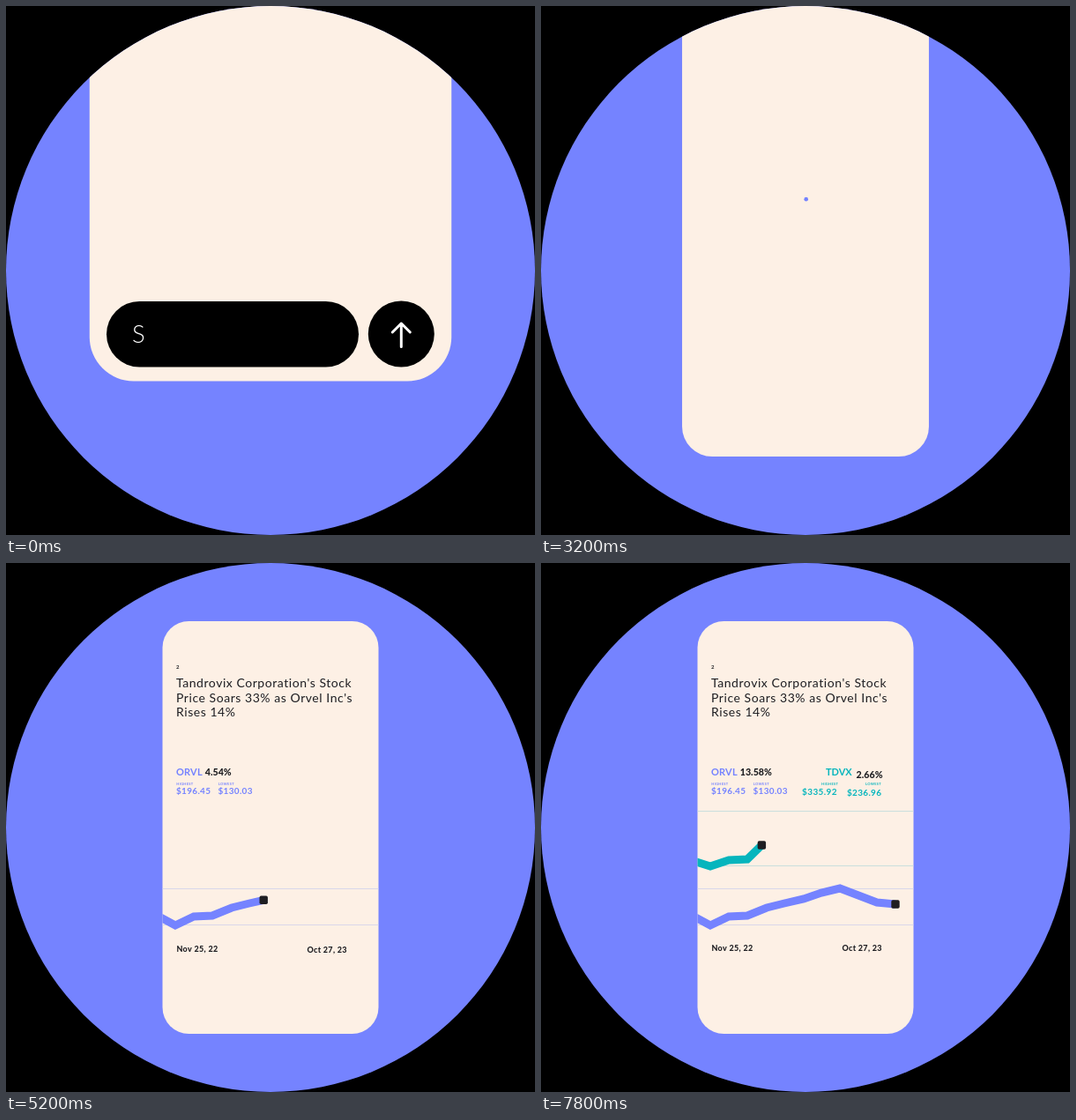
Recreate the animation shown at these times as an HTML page with a canvas. Size 600x600 px, loop 8 s.

```html
<!DOCTYPE html>
<html lang="en">
<head>
<meta charset="utf-8">
<title>Ask and compare</title>
<style>
html, body { margin: 0; width: 100%; height: 100%; overflow: hidden; background: #000; }
canvas { display: block; width: 600px; height: 600px; }
</style>
</head>
<body>
<canvas id="stage" width="600" height="600"></canvas>
<script>
const ctx = document.getElementById('stage').getContext('2d');
const LOOP = 8000, STEP = 200;
const BLUE = '#7583ff', CREAM = '#fdf0e5', TEAL = '#06b5bd', DARK = '#1e1e22';
const QUESTION = 'Should I invest in Orvel or Tandrovix?';
const TITLE = ["Tandrovix Corporation's Stock", "Price Soars 33% as Orvel Inc's", 'Rises 14%'];
const BLUE_LINE = [[170, 399], [192, 411], [213, 401], [234, 400], [256, 391], [276, 386],
  [298, 381], [318, 374], [339, 369], [360, 377], [381, 385], [402, 387]];
const TEAL_LINE = [[170, 337], [192, 344], [213, 337], [234, 336], [256, 314.5]];

const clamp = v => Math.max(0, Math.min(1, v));
const mix = (a, b, u) => a + (b - a) * u;
const part = (t, start, dur) => clamp((t - start) / dur);
const outQuad = u => 1 - (1 - u) ** 2;
const outCubic = u => 1 - (1 - u) ** 3;
const inOutCubic = u => u < .5 ? 4 * u ** 3 : 1 - 4 * (1 - u) ** 3;

function disc(x, y, r, color) {
  ctx.fillStyle = color;
  ctx.beginPath();
  ctx.arc(x, y, r, 0, Math.PI * 2);
  ctx.fill();
}

function box(x, y, w, h, r, color) {
  ctx.fillStyle = color;
  ctx.beginPath();
  ctx.roundRect(x, y, w, h, r);
  ctx.fill();
}

function write(text, x, y, size, weight, color, spacing = 0) {
  ctx.font = `${weight} ${size}px Lato, sans-serif`;
  ctx.letterSpacing = spacing + 'px';
  ctx.fillStyle = color;
  ctx.fillText(text, x, y);
}

// Text that slides up into place from its start time on.
function rise(t, start, drop, text, x, y, ...style) {
  if (t < start) return;
  write(text, x, y + drop * (1 - outCubic(part(t, start, 700))), ...style);
}

function cardAt(t) {
  const u = inOutCubic(part(t, 2700, 800));
  const w = mix(410.5, 245, u), h = w * 468 / 245, bottom = mix(425.5, 534, u);
  return { x: 300 - w / 2, y: bottom - h, w, h, bottom, r: w * .122 };
}

function drawField(t) {
  ctx.save();
  box(114, 335, 286, 74.5, 37.25, '#000');
  ctx.clip();
  const text = QUESTION.slice(0, 1 + Math.floor(t * 25 / 1600));
  const caret = t > 0 && t < 2400;
  ctx.font = '300 27.5px Lato, sans-serif';
  ctx.letterSpacing = '0px';
  const width = ctx.measureText(text).width;
  const x = Math.min(143, (caret ? 376 : 380) - width);
  write(text, x, 382, 27.5, 300, '#fff');
  if (caret) {
    ctx.fillStyle = '#fff';
    ctx.fillRect(x + width + 2, 360, 1.5, 26);
  }
  ctx.restore();
}

function drawButton(t) {
  const press = Math.sin(Math.PI * part(t, 2450, 400));
  const k = 1 - .057 * press;
  ctx.save();
  ctx.translate(448.3, 372);
  ctx.scale(k, k);
  disc(0, 0, 37.5, '#000');
  ctx.strokeStyle = `rgb(${mix(255, 200, press)}, ${mix(255, 203, press)}, ${mix(255, 242, press)})`;
  ctx.lineWidth = 3;
  ctx.lineCap = ctx.lineJoin = 'round';
  ctx.beginPath();
  ctx.moveTo(0, 14.5);
  ctx.lineTo(0, -12);
  ctx.moveTo(-10, -2);
  ctx.lineTo(0, -12);
  ctx.lineTo(10, -2);
  ctx.stroke();
  ctx.restore();
}

function drawPrompt(t, card) {
  const k = card.w / 410.5;
  ctx.save();
  ctx.globalAlpha = 1 - part(t, 2800, 350);
  ctx.translate(300, card.bottom);
  ctx.scale(k, k);
  ctx.translate(-300, -425.5);
  drawField(t);
  drawButton(t);
  ctx.restore();
}

function drawLoader(t, card) {
  const r = 11 * outQuad(part(t, 3150, 450)) * (1 - part(t, 3900, 300));
  if (r > 0) disc(300.7, card.y + card.h * .454, r, BLUE);
}

// One growing graph with its two guide lines.
function drawGraph(t, start, points, color, guides, guideColor) {
  if (t < start - 100) return;
  ctx.fillStyle = guideColor;
  for (const y of guides) ctx.fillRect(177.5, y, 245, 1);
  if (t < start) return;

  const end = mix(177, 402, outQuad(part(t, start, 1340)));
  let [x, y] = points[0];
  ctx.beginPath();
  ctx.moveTo(x, y);
  for (const [px, py] of points.slice(1)) {
    const u = Math.min(1, (end - x) / (px - x));
    x = mix(x, px, u);
    y = mix(y, py, u);
    ctx.lineTo(x, y);
    if (u < 1) break;
  }
  ctx.strokeStyle = color;
  ctx.lineWidth = 9;
  ctx.lineCap = 'butt';
  ctx.lineJoin = 'miter';
  ctx.stroke();
  box(x - 4.7, y - 4.7, 9.4, 9.4, 1.8, DARK);
}

function percent(t, start, total) {
  return (total * outQuad(part(t, start, 2172))).toFixed(2) + '%';
}

function drawReport(t) {
  if (t >= 4150) write('2', 193, 119.5, 6, 700, DARK);
  TITLE.forEach((line, i) =>
    rise(t, 4250 + 45 * i, 16, line, 193, 141.2 + 16.6 * i, 14, 400, DARK, .55));

  const ticker = [11, 700], tag = [4, 700], price = [10, 700];
  rise(t, 4210, 12, 'ORVL', 193, 240.5, ...ticker, BLUE, .2);
  rise(t, 4770, 12, percent(t, 4800, 13.58), 225.7, 240.5, 10.7, 800, DARK);
  rise(t, 4580, 12, 'HIGHEST', 193.3, 251.5, ...tag, BLUE, .3);
  rise(t, 4630, 12, '$196.45', 193, 262, ...price, BLUE, .3);
  rise(t, 4630, 12, 'LOWEST', 240.8, 251.5, ...tag, BLUE, .3);
  rise(t, 4680, 12, '$130.03', 240.5, 262, ...price, BLUE, .3);

  rise(t, 6980, 12, 'TDVX', 323, 240.5, ...ticker, TEAL);
  rise(t, 7541, 12, percent(t, 7300, 6.53), 357.5, 240.5, 10.7, 800, DARK);
  rise(t, 7350, 12, 'HIGHEST', 318, 251.5, ...tag, TEAL, .3);
  rise(t, 7400, 12, '$335.92', 296, 262, ...price, TEAL, .4);
  rise(t, 7400, 12, 'LOWEST', 368, 251.5, ...tag, TEAL, .3);
  rise(t, 7450, 12, '$236.96', 347, 262, ...price, TEAL, .3);

  drawGraph(t, 4796, BLUE_LINE, BLUE, [369, 410], '#d9d7ea');
  drawGraph(t, 7560, TEAL_LINE, TEAL, [281, 343], '#c9dfdd');
  rise(t, 4820, 12, 'Nov 25, 22', 193.5, 440, 9, 800, DARK, .3);
  rise(t, 4870, 12, 'Oct 27, 23', 341.5, 440, 9, 800, DARK, .3);
}

function draw(t) {
  ctx.fillStyle = '#000';
  ctx.fillRect(0, 0, 600, 600);
  ctx.save();
  disc(300, 300, 300, BLUE);
  ctx.clip();
  const card = cardAt(t);
  box(card.x, card.y, card.w, card.h, card.r, CREAM);
  ctx.clip();
  if (t < 3150) drawPrompt(t, card);
  drawLoader(t, card);
  drawReport(t);
  ctx.restore();
}

const begin = performance.now();
function tick() {
  const t = (performance.now() - begin) % LOOP;
  draw(Math.floor(t / STEP) * STEP);
  requestAnimationFrame(tick);
}
tick();
</script>
</body>
</html>
```
